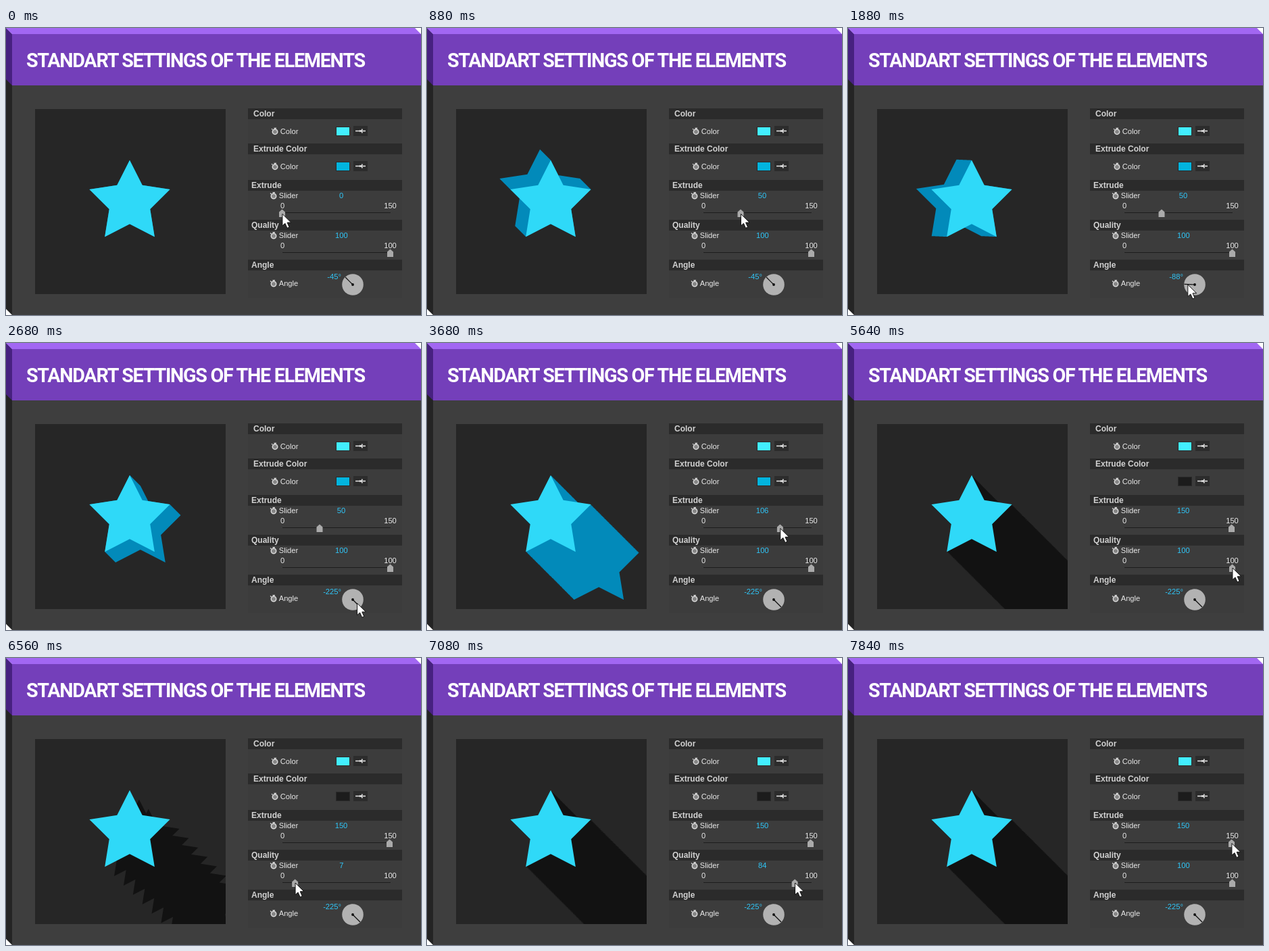
An HTML page that plays this animation: 614x425 px, repeating every 8000 ms.

```html
<!DOCTYPE html>
<html lang="en">
<head>
<meta charset="utf-8">
<title>Standart settings of the elements</title>
<style>
html, body { margin: 0; width: 100%; height: 100%; overflow: hidden; background: #fff; }
svg { display: block; }
text { font: 11.2px "Liberation Sans", Arial, sans-serif; fill: #e8e8e8; }
.head { font-weight: bold; font-size: 12px; fill: #d2d2d2; }
.mid { text-anchor: middle; }
.value { fill: #2fc6f8; }
#title { font: 700 40px sans-serif; font-stretch: 62.5%; letter-spacing: -.045em; fill: #fff; }
</style>
</head>
<body>
<svg width="614" height="425" viewBox="0 0 614 425">
  <defs>
    <clipPath id="view"><path d="M43 120H325V394H43Z"/></clipPath>
    <g id="watch" fill="none" stroke="#dcdcdc">
      <circle cy="1" r="3.7" fill="#858585" stroke-width="1.5"/>
      <path d="M-1.5 -4.3H2M0 -4V-2M-5 -3.5L-3.5 -2" stroke-width="1.2"/>
    </g>
    <g id="dropper">
      <path d="M0 0H21V15H0Z" fill="#2c2c2c"/>
      <path d="M3 7.5H10M14 7.5H18" stroke="#e6e6e6" stroke-width="1.6"/>
      <path d="M9 6.2H12V4.5H13.6V10.5H12V8.8H9Z" fill="#e6e6e6"/>
    </g>
    <path id="thumb" d="M0 268.5L4.5 272.5V280H-4.5V272.5Z" fill="#aaa"/>
  </defs>

  <path d="M0 0L9 9V425L0 416Z" fill="#242424"/>
  <path d="M0 0L9 9V85L0 76Z" fill="#472180"/>
  <path d="M0 0H605L614 9V10H9V9Z" fill="#a267f2"/>
  <path d="M9 85H614V425H9Z" fill="#3e3e3e"/>
  <path d="M9 9H614V85H9Z" fill="#743fba"/>
  <text id="title" x="30">STANDART SETTINGS OF THE ELEMENTS</text>

  <path d="M43 120H325V394H43Z" fill="#262626"/>
  <g clip-path="url(#view)">
    <path id="shade"/>
    <path id="star" fill="#2fd9f8"/>
  </g>

  <path d="M358 119H586V400H358Z" fill="#3c3c3c"/>
  <g id="panel"></g>
  <g stroke="#1d1d1d"><path d="M409 273.5H569M409 332.5H569"/></g>
  <use id="exThumb" href="#thumb"/>
  <use id="quThumb" href="#thumb" y="59"/>
  <text id="exValue" class="mid value" x="496" y="252"/>
  <text id="quValue" class="mid value" x="496.3" y="311"/>
  <text id="anValue" class="value" x="496" y="372" text-anchor="end"/>
  <circle cx="513" cy="380" r="15.8" fill="#b2b2b2"/>
  <path id="needle" stroke="#0c0c0c" stroke-width="1.2"/>
  <circle cx="513" cy="380" r="1.9" fill="#0c0c0c"/>
  <path id="cursor" d="M0 0V17.6L4 14 7.1 21 10.2 19.6 7.2 12.8H12.8Z" fill="#fff" stroke="#111"/>
</svg>
<script>
const $ = id => document.getElementById(id);
const set = (id, name, value) => $(id).setAttribute(name, value);

const label = (x, y, text, cls = '') => `<text x="${x}" y="${y}" class="${cls}">${text}</text>`;
const head = (x, y, text) =>
  `<rect x="358" y="${y}" width="228" height="16" fill="#2b2b2b"/>` + label(x, y + 12, text, 'head');
const row = (x, y, text) => `<use href="#watch" x="${x}" y="${y}"/>` + label(x + 7.7, y + 4, text);
const swatch = (id, y, color) => row(398, y - .3, 'Color') +
  `<rect id="${id}" x="488.5" y="${y - 6.5}" width="20" height="13" fill="${color}" stroke="#2a2a2a"/>
   <use href="#dropper" x="514" y="${y - 8}"/>`;
const slider = (y, max) => row(396, y, 'Slider') +
  label(409, y + 19, 0, 'mid') + label(568.5, y + 19, max, 'mid');

$('panel').innerHTML =
  head(366, 119, 'Color') + swatch('fillColor', 153, '#42eeff') +
  head(366, 171, 'Extrude Color') + swatch('shadeColor', 205, '#02b4de') +
  head(363, 225, 'Extrude') + slider(248, 150) +
  head(363, 284, 'Quality') + slider(307, 100) +
  head(363, 343, 'Angle') + row(396, 378, 'Angle');

// Heading: the narrowest condensed face, at the size that gives its line length
const title = $('title');
const lengthIn = family => {
  title.style.fontFamily = `"${family}", sans-serif`;
  return title.getComputedTextLength();
};
const [family] = ['Noto Sans', 'Roboto', 'Open Sans'].sort((a, b) => lengthIn(a) - lengthIn(b));
const size = 40 * 501 / lengthIn(family);
title.style.fontSize = size + 'px';
set('title', 'y', 48 + size * .357);

function starPath(dx, dy) {
  const points = Array.from({ length: 10 }, (_, i) => {
    const a = i * Math.PI / 5, r = i % 2 ? 31.8 : 62.7;
    return (183 + dx + r * Math.sin(a)).toFixed(2) + ' ' + (258.4 + dy - r * Math.cos(a)).toFixed(2);
  });
  return 'M' + points.join('L') + 'Z';
}
set('star', 'd', starPath(0, 0));

function draw(now) {
  const t = Math.floor(now % 8000 / 40) * 40;
  const ease = (from, to) => {
    const u = Math.min(1, Math.max(0, (t - from) / (to - from)));
    return u * u * (3 - 2 * u);
  };
  const grow = ease(240, 880), stretch = ease(3110, 4160);
  const coarse = ease(5800, 6400) - ease(6520, 7280);

  const angle = -45 - 180 * ease(1640, 2400);
  const dirX = Math.sin(angle * Math.PI / 180), dirY = -Math.cos(angle * Math.PI / 180);
  const quality = 100 - 94 * coarse;
  const exX = 408.5 + 55.5 * grow + 103.5 * stretch;
  const quX = 568.5 - 142 * coarse;

  // Extrusion: evenly spaced copies of the star, fewer at low quality
  const depth = 22.6 * grow + 139.4 * stretch;
  const copies = quality + 1.5;
  let d = '';
  for (let i = 1; i <= copies; i++) {
    const r = depth * i / copies;
    d += starPath(r * dirX, r * dirY);
  }
  set('shade', 'd', d);
  const dark = t >= 4880;
  set('shade', 'fill', dark ? '#121212' : '#028aba');
  set('shadeColor', 'fill', dark ? '#1c1c1c' : '#02b4de');

  set('exThumb', 'x', exX);
  set('quThumb', 'x', quX);
  $('exValue').textContent = Math.round(50 * grow + 100 * stretch);
  $('quValue').textContent = Math.round(quality);
  $('anValue').textContent = Math.round(angle) + '°';
  set('needle', 'd', `M513 380l${15.5 * dirX} ${15.5 * dirY}`);

  let x = exX, y = 275.3;
  const go = (toX, toY, k) => { x += (toX - x) * k; y += (toY - y) * k; };
  go(513 + 10.6 * dirX, 380.5 + 10.6 * dirY, ease(960, 1520));
  go(exX, 274.5, ease(2640, 3080));
  go(499, 205.5, ease(4280, 4800));
  go(quX, 333, ease(5040, 5640));
  go(567.5, 274.5, ease(7440, 7840));
  set('cursor', 'transform', `translate(${x + .4} ${y})`);
}

const start = performance.now();
function tick() {
  draw(performance.now() - start);
  requestAnimationFrame(tick);
}
tick();
</script>
</body>
</html>
```
